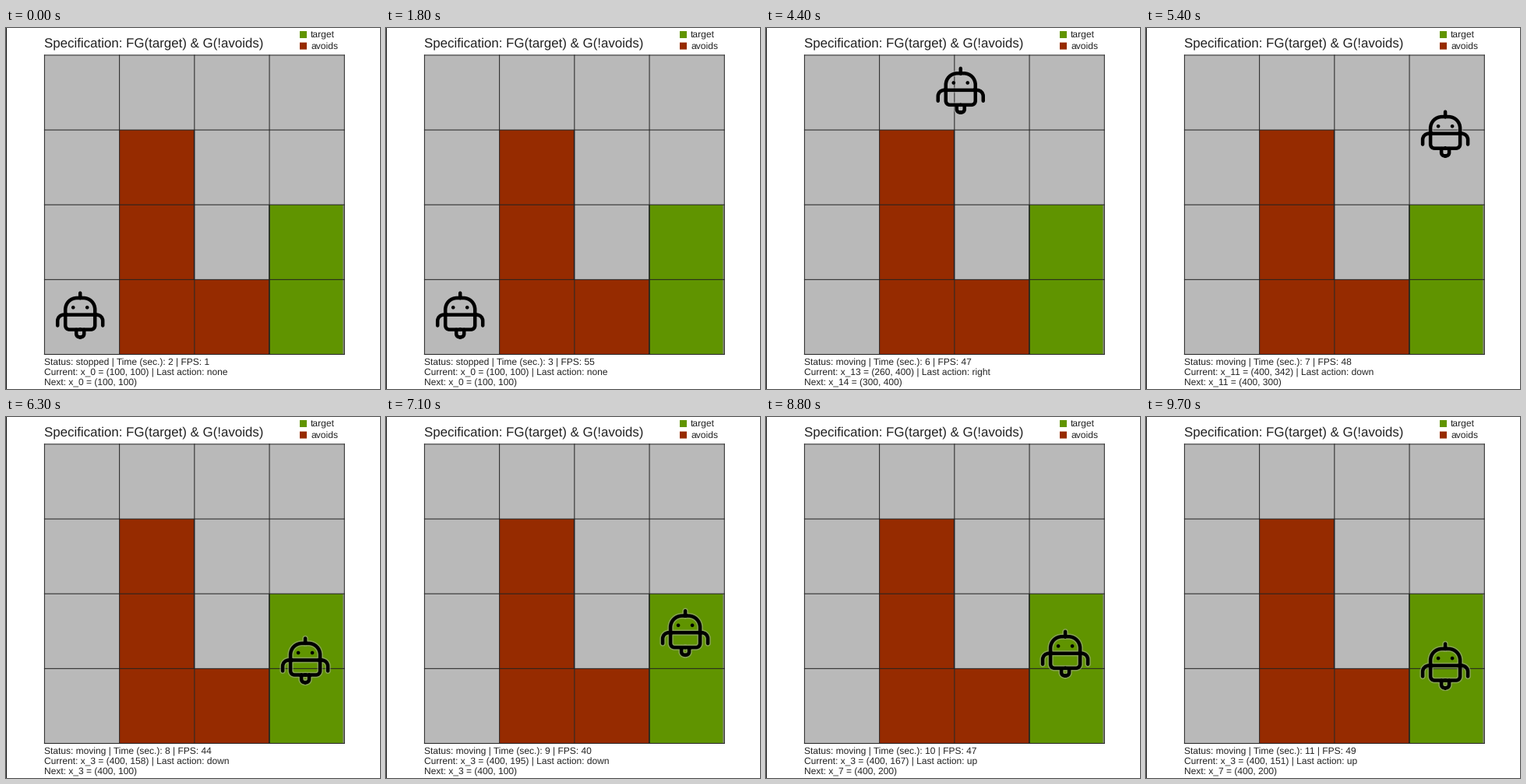
Animation, 480 px wide and 464 px high, one loop 9.8 s. Source, as a matplotlib script:

```python
import numpy as np
import matplotlib.pyplot as plt
from matplotlib.animation import FuncAnimation
from matplotlib.patches import Circle, PathPatch, Rectangle
from matplotlib.path import Path
from matplotlib.transforms import Affine2D

W, H, DPI = 480, 464, 80
PT = 72 / DPI                      # points per pixel
FRAMES, STEP = 98, 100
GRAY, RED, GREEN, INK = "#b9b9b9", "#962b00", "#609400", "#222222"
XS = np.linspace(49.4, 434.3, 5)
YS = np.linspace(34.9, 419.5, 5)

plt.rcParams.update({"font.family": "Liberation Sans", "text.hinting": "none",
                     "path.snap": False})
fig = plt.figure(figsize=(W / DPI, H / DPI), dpi=DPI, facecolor="white")
ax = fig.add_axes([0, 0, 1, 1])
ax.set(xlim=(0, W), ylim=(H, 0))
ax.axis("off")


def box(x0, y0, x1, y1, color, z=1):
    ax.add_patch(Rectangle((x0, y0), x1 - x0, y1 - y0, fc=color, lw=0, zorder=z))


def label(x, y, text, size=12):
    return ax.text(x, y, text, size=size * PT, color=INK, va="baseline")


def cells(col, row, cols, rows, color):
    """Fill a block of cells; rows count upwards from the lower left one."""
    box(XS[col], YS[4 - row - rows], XS[col + cols], YS[4 - row], color, 2)


# Board
box(0, 0, 1, H, "#111111")
box(XS[0], YS[0], XS[-1], YS[-1], GRAY)
cells(1, 0, 1, 3, RED)
cells(2, 0, 1, 1, RED)
cells(3, 0, 1, 2, GREEN)
box(432.3, YS[2], 434.3, YS[4], "#8a8f80", 3)
box(240.8, YS[1], 242.2, YS[3], "#2a2430", 3)
box(337.2, YS[2], 338.6, YS[4], "#1c2a1c", 3)
for x in XS:
    ax.plot([x, x], [YS[0], YS[-1]], color=INK, lw=PT, zorder=4)
for y in YS:
    ax.plot([XS[0], XS[-1]], [y, y], color=INK, lw=PT, zorder=4)

# Title and legend
label(49, 24.4, "Specification: FG(target) & G(!avoids)", 16.85)
for y, color, name in [(4, GREEN, "target"), (18.6, RED, "avoids")]:
    box(377, y, 386, y + 9, color)
    label(391, y + 8.6, name, 12.1)
lines = [label(49, y, "") for y in (433.6, 446.6, 459.6)]

# Robot, drawn around its own centre
M, L, C = Path.MOVETO, Path.LINETO, Path.CURVE4
WAIST = -2.4
HALF = [
    (M, (0, -24)), (L, (4, -24)),
    (C, (12.5, -24)), (C, (19, -17.5)), (C, (19, -9)),
    (L, (19, 11)), (C, (19, 14.5)), (C, (17, 16.6)), (C, (13.5, 16.6)),
    (L, (0, 16.6)),
    (M, (19, WAIST)), (L, (21, WAIST)),
    (C, (25.5, WAIST)), (C, (29, 1)), (C, (29, 5.5)), (L, (29, 11.5)),
    (M, (5, 17)), (L, (5, 22)),
    (C, (5, 25)), (C, (3, 26.4)), (C, (0, 26.4)),
]
codes = [c for c, _ in HALF]
right = np.array([p for _, p in HALF], float)
verts = np.vstack([right, right * [-1, 1],
                   [(-19, WAIST), (19, WAIST), (0, -30.4), (0, -24)]])
outline = Path(verts, codes * 2 + [M, L, M, L])
place = Affine2D()
to_stage = place + ax.transData
for color, width, alpha in [(GRAY, 7.5, 0.45), ("black", 4.5, 1)]:
    ax.add_patch(PathPatch(outline, fc="none", ec=color, lw=width * PT, alpha=alpha,
                           capstyle="round", joinstyle="round",
                           transform=to_stage, zorder=6))
for x in (-9, 9):
    ax.add_patch(Circle((x, -11.8), 2.3, fc="black", lw=0, transform=to_stage, zorder=6))

# Route: up, right, down, then to and fro between the two target cells
ROUTE = [(1, 1), (1, 2), (1, 3), (1, 4), (2, 4), (3, 4), (4, 4), (4, 3), (4, 2)]
ROUTE += [(4, 1), (4, 2)] * 4
ACTIONS = {(0, 1): "up", (0, -1): "down", (1, 0): "right"}
TIMES = [2.05, 3.4, 5.4, 7.1, 8.0, 9.7]
TRAVEL = [0, 263, 658, 1005, 1204, 1551]
FPS = [1, 55, 50, 46, 47, 48, 44, 40, 47, 49]


def state(col, row):
    return f"x_{4 * (row - 1) + col - 1}"


def update(i):
    t = i * STEP / 1000
    clock = (i + 21) // 10
    dist = np.interp(t, TIMES, TRAVEL)
    leg = int(dist // 100)
    a, b = np.array(ROUTE[leg]), np.array(ROUTE[leg + 1])
    x, y = 100 * a + (b - a) * (dist - 100 * leg)
    here = np.minimum(a, b)
    moving = t > TIMES[0]
    if not moving:
        b = a
    action = ACTIONS[tuple(b - a)] if moving else "none"
    status = "moving" if moving else "stopped"

    place.clear().translate(95.2 + (x - 100) * 0.963, 371 - (y - 100) * 0.9625)
    lines[0].set_text(f"Status: {status} | Time (sec.): {clock} | FPS: {FPS[clock - 2]}")
    lines[1].set_text(f"Current: {state(*here)} = ({x:.0f}, {y:.0f}) | Last action: {action}")
    lines[2].set_text(f"Next: {state(*b)} = ({100 * b[0]}, {100 * b[1]})")
    return lines


anim = FuncAnimation(fig, update, frames=FRAMES, interval=STEP, repeat=True,
                     repeat_delay=0, blit=False)
plt.show()
```
